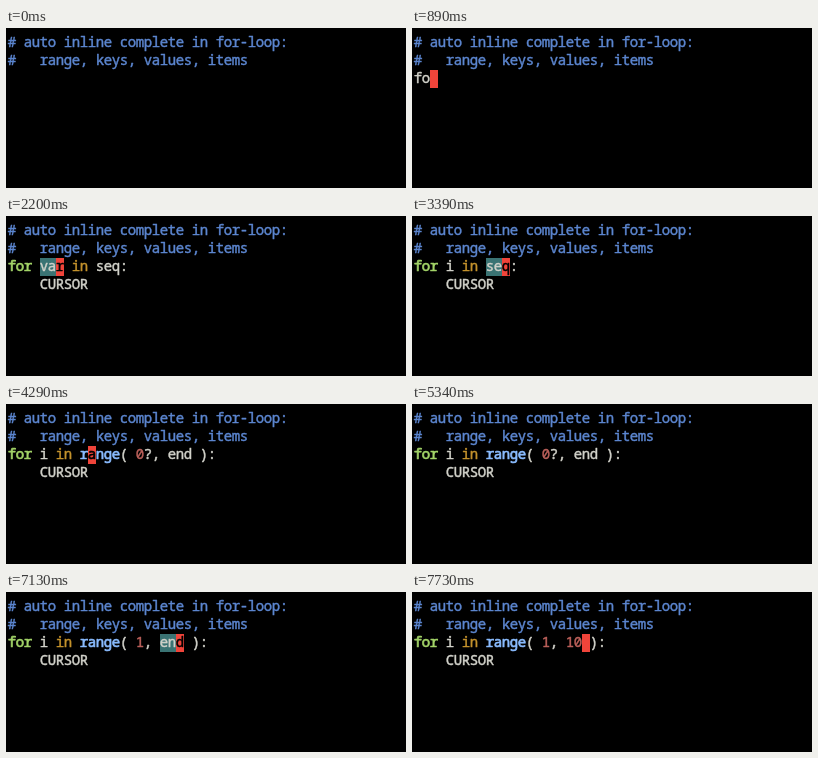
These frames come from a looping animation (400x160 px, 8000 ms). An HTML page with a canvas:

```html
<!DOCTYPE html>
<html lang="en">
<head>
<meta charset="utf-8">
<title>Inline completion in a for-loop</title>
<style>
  html, body { margin: 0; width: 100%; height: 100%; overflow: hidden; background: #000; }
  canvas { display: block; width: 400px; height: 160px; }
</style>
</head>
<body>
<canvas id="stage"></canvas>
<script>
const LOOP = 8000, CELL = 8, LEFT = 2, TOP = 6, ROW = 18, BASE = 13;
const FONT = '14px "Noto Sans Mono", "DejaVu Sans Mono", monospace';
const MEDIUM = 0.45, BOLD = 0.7;
const COLOR = {
  comment: '#5c86d0', keyword: '#a3d468', operator: '#c4922c', call: '#8abcff',
  number: '#bd615b', plain: '#d2d2ca', cursor: '#f0443a', select: '#3a7373'
};
const COMMENTS = ['# auto inline complete in for-loop:', '#   range, keys, values, items'];

// at: start time, code: typed line, cur: cursor column, sel: first selected column
const STEPS = [
  { at: 0, code: '' },
  { at: 760, code: 'f', cur: 1 },
  { at: 885, code: 'fo', cur: 2 },
  { at: 1010, code: 'for', cur: 3 },
  { at: 1600, code: 'for' },
  { at: 2200, code: 'for var in seq:', cur: 6, sel: 4 },
  { at: 2800, code: 'for i in seq:', cur: 5 },
  { at: 3240, code: 'for i in seq:', sel: 9, end: 11 },
  { at: 3390, code: 'for i in seq:', cur: 11, sel: 9 },
  { at: 4290, code: 'for i in range( 0?, end ):', cur: 10 },
  { at: 5340, code: 'for i in range( 0?, end ):' },
  { at: 6090, code: 'for i in range( 0?, end ):', cur: 17, sel: 16 },
  { at: 6540, code: 'for i in range( 1, end ):', cur: 17 },
  { at: 6990, code: 'for i in range( 1, end ):' },
  { at: 7130, code: 'for i in range( 1, end ):', cur: 21, sel: 19 },
  { at: 7430, code: 'for i in range( 1, 1 ):', cur: 20 },
  { at: 7730, code: 'for i in range( 1, 10 ):', cur: 21 }
];

const canvas = document.getElementById('stage');
const ctx = canvas.getContext('2d');
const ratio = window.devicePixelRatio || 1;
canvas.width = 400 * ratio;
canvas.height = 160 * ratio;
ctx.scale(ratio, ratio);
ctx.font = FONT;
ctx.textAlign = 'center';
ctx.lineJoin = 'round';

// Each letter is centred in its cell; a thin outline sets the weight.
function write(text, row, col, color, weight = MEDIUM) {
  ctx.fillStyle = ctx.strokeStyle = color;
  ctx.lineWidth = weight;
  [...text].forEach((ch, i) => {
    const x = LEFT + (col + i + 0.5) * CELL, y = TOP + row * ROW + BASE;
    ctx.fillText(ch, x, y);
    ctx.strokeText(ch, x, y);
  });
}

function block(from, to, color) {
  ctx.fillStyle = color;
  ctx.fillRect(LEFT + from * CELL, TOP + 2 * ROW, (to - from) * CELL, ROW);
}

function style(word) {
  if (word === 'for') return [COLOR.keyword, BOLD];
  if (word === 'in') return [COLOR.operator, MEDIUM];
  if (word === 'range') return [COLOR.call, BOLD];
  if (/^\d/.test(word)) return [COLOR.number, MEDIUM];
  return [COLOR.plain, MEDIUM];
}

function draw(step) {
  const { code, cur, sel } = step;
  ctx.fillStyle = '#000';
  ctx.fillRect(0, 0, 400, 160);
  COMMENTS.forEach((line, row) => write(line, row, 0, COLOR.comment));

  if (sel !== undefined) block(sel, step.end ?? cur, COLOR.select);
  if (cur !== undefined) block(cur, cur + 1, COLOR.cursor);

  for (const { 0: word, index } of code.matchAll(/[a-z]+|\d+|[^\sa-z\d]/g)) {
    const [color, weight] = style(word);
    [...word].forEach((ch, i) =>
      write(ch, 2, index + i, index + i === cur ? '#000' : color, weight));
  }
  if (code.endsWith(':')) write('CURSOR', 3, 4, COLOR.plain);
}

const start = performance.now();
function tick() {
  const t = (performance.now() - start) % LOOP;
  draw(STEPS.findLast(s => s.at <= t) || STEPS[0]);
  requestAnimationFrame(tick);
}
tick();
</script>
</body>
</html>
```
